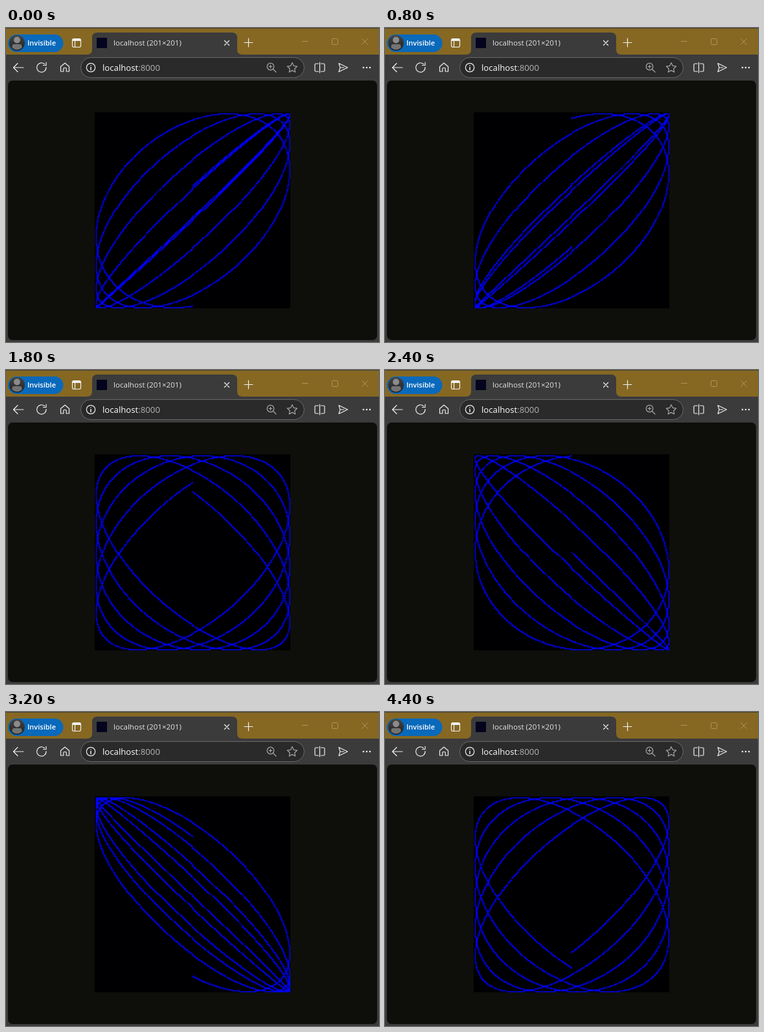
Animation, 576 px wide and 484 px high, one loop 4600 ms. Source, as an HTML page with a canvas:

```html
<!DOCTYPE html>
<html lang="en">
<head>
<meta charset="utf-8">
<title>Lissajous</title>
<style>
  html, body { margin: 0; width: 100%; height: 100%; overflow: hidden; background: #3b3b3b; }
  svg, canvas { position: absolute; display: block; }
  svg { left: 0; top: 0; }
  canvas { left: 137px; top: 130px; width: 302px; height: 302px; }
  text { font-family: "Open Sans", "Noto Sans", sans-serif; }
  .icon { fill: none; stroke: #f0f0f0; stroke-width: 1.2; stroke-linecap: round; stroke-linejoin: round; }
  .soft { stroke: #a8a8a8; }
  .dim { stroke: #ad955b; stroke-width: 1; }
</style>
</head>
<body>
<svg width="576" height="484" viewBox="0 0 576 484">
  <defs>
    <linearGradient id="face" x2="0" y2="1">
      <stop offset="0" stop-color="#454545"/>
      <stop offset="1" stop-color="#202020"/>
    </linearGradient>
  </defs>

  <!-- window, title bar, page -->
  <rect width="576" height="484" fill="#3b3b3b"/>
  <rect width="576" height="41" fill="#866823"/>
  <rect width="576" height="1" fill="#4a4230"/>
  <rect x="3" y="81" width="570" height="400" rx="7" fill="#0e0e0b"/>

  <!-- private badge -->
  <rect x="3" y="10" width="85.500" height="27" rx="13.500" fill="#0969bb"/>
  <circle cx="17" cy="23" r="12" fill="url(#face)"/>
  <circle cx="17" cy="18.500" r="5" fill="#8b8b8b"/>
  <path d="M9.500 30.500V28q0-3 3-3h9q3 0 3 3v2.500q-7.500 6-15 0z" fill="#737373"/>
  <text x="33" y="27" font-size="11" font-weight="600" fill="#fff">Invisible</text>

  <!-- tab -->
  <path d="M125 41q8 0 8-8V15q0-8 8-8h208q8 0 8 8v18q0 8 8 8z" fill="#3b3b3b"/>
  <rect x="140" y="15" width="16" height="16" fill="#04041f"/>
  <text x="166" y="27" font-size="11.600" fill="#e4e4e4">localhost (201×201)</text>
  <g class="icon">
    <rect x="102.500" y="16.500" width="13" height="13" rx="2.500"/>
    <path d="M102.500 19.500h13M106.500 20v9.500" />
    <path d="M103.500 18h11" stroke-width="2"/>
    <path d="M337.500 19.500l7 7m0-7l-7 7"/>
    <path d="M368 22.500h13M374.500 16v13"/>
  </g>
  <g class="icon dim">
    <path d="M457.500 20.500h9M549.500 16.500l9 9m0-9l-9 9"/>
    <rect x="503.500" y="16.500" width="9" height="9" rx="1"/>
  </g>

  <!-- toolbar -->
  <rect x="115.500" y="45.500" width="345" height="31" rx="15.500" fill="#2a2a2a" stroke="#696969"/>
  <g class="icon">
    <path d="M27 61H11.500M18 54.500L11.500 61l6.500 6.500"/>
    <path d="M62 60.500a7.200 7.200 0 1 1-2.500-5M62 53v4.500h-4.500"/>
    <path d="M84.500 59.500l6.500-5.500 6.500 5.500v7.500h-4.300v-4.500q0-1-1-1h-2.400q-1 0-1 1V67h-4.300z"/>
    <circle cx="131" cy="61" r="6.700"/>
    <path d="M131 60.500v4M131 57.700v.1" stroke-width="1.500"/>
    <path d="M482.500 55h-4q-1.500 0-1.500 1.500v9q0 1.500 1.500 1.500h4M486.500 55h4q1.500 0 1.500 1.500v9q0 1.500-1.500 1.500h-4M484.500 53v16"/>
    <path d="M514 54.500L527.500 61 514 67.500l2-6.500zM516 61h6"/>
  </g>
  <g fill="#f0f0f0">
    <circle cx="552" cy="61" r="1.300"/><circle cx="557" cy="61" r="1.300"/><circle cx="562" cy="61" r="1.300"/>
  </g>
  <g class="icon soft">
    <circle cx="408.500" cy="59.500" r="5.300"/>
    <path d="M412.500 63.500l4.500 4.500M406 59.500h5M408.500 57v5"/>
    <path id="star"/>
  </g>
  <text x="149" y="66" font-size="13.200" fill="#fff">localhost<tspan fill="#b4b4b4">:8000</tspan></text>
</svg>
<canvas id="plot" width="201" height="201"></canvas>

<script>
const SIZE = 100, SIDE = 2 * SIZE + 1;
const CYCLES = 5, RES = 0.001, FREQ = 0.94786;
const LOOP = 4600, HOLD = 200, DELAY = 80, PHASES = 64, FIRST = 34;

const ctx = document.getElementById('plot').getContext('2d');
const image = ctx.createImageData(SIDE, SIDE);
const pixels = new Uint32Array(image.data.buffer);
const BLACK = 0xff020000, BLUE = 0xfff80000;

function starPath(cx, cy, outer, inner) {
  const points = Array.from({ length: 10 }, (_, i) => {
    const r = i % 2 ? inner : outer, a = i * Math.PI / 5;
    return (cx + r * Math.sin(a)).toFixed(1) + ' ' + (cy - r * Math.cos(a)).toFixed(1);
  });
  return 'M' + points.join('L') + 'Z';
}
document.getElementById('star').setAttribute('d', starPath(442, 61.5, 8, 3.9));

// Truncation toward zero gives the small jog at the centre lines.
const cell = v => SIZE + Math.trunc(v * SIZE + 0.5);

function plot(phase) {
  pixels.fill(BLACK);
  for (let t = 0; t < CYCLES * 2 * Math.PI; t += RES) {
    pixels[cell(Math.sin(t * FREQ + phase)) * SIDE + cell(Math.sin(t))] = BLUE;
  }
  ctx.putImageData(image, 0, 0);
}

let shown = -1;
function update(now) {
  const held = Math.floor(now % LOOP / HOLD) * HOLD;
  const index = (FIRST + Math.floor(held / DELAY)) % PHASES;
  if (index !== shown) {
    shown = index;
    plot(index * 0.1);
  }
}

let start;
function tick(now) {
  start ??= now;
  update(now - start);
  requestAnimationFrame(tick);
}
update(0);
requestAnimationFrame(tick);
</script>
</body>
</html>
```
